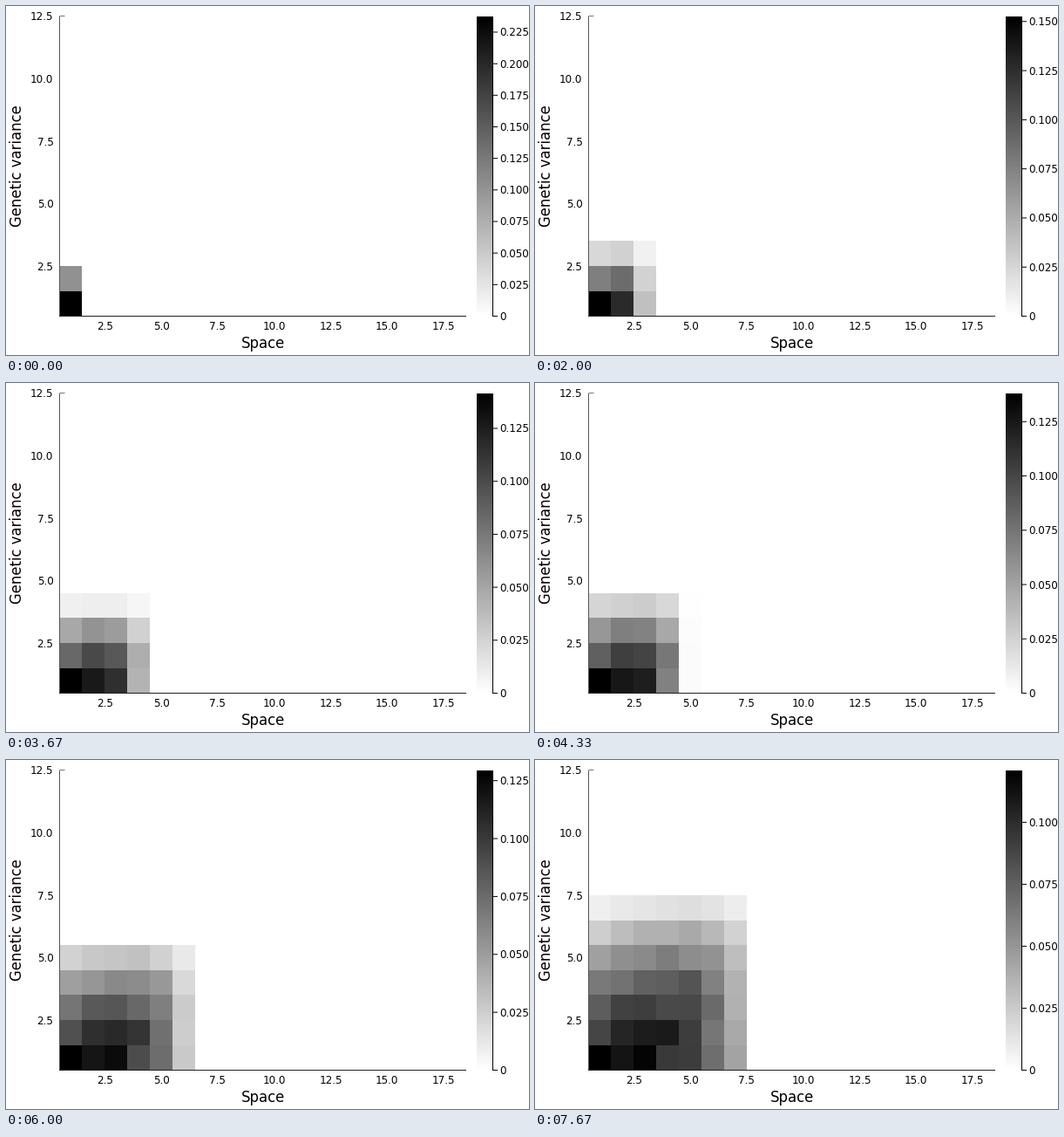
A matplotlib script that plays this animation: 600 px wide and 400 px high, repeating every 8 s.

```python
import matplotlib.pyplot as plt
import numpy as np
from matplotlib.animation import FuncAnimation

W, H, DPI = 600, 400, 100
STEPS, LOOP_MS, INTERVAL = 24, 8000, 50
LEFT, RIGHT, TOP, BOTTOM = 61.5, 528, 12, 355.3
COLS, ROWS = 18, 12
BAR_LEFT, BAR_RIGHT = 540, 558
TICK_STEP = 0.025

rng = np.random.default_rng(4)
grain = rng.uniform(0.9, 1.1, (ROWS, COLS))
space, variance = np.meshgrid(np.arange(COLS), np.arange(ROWS))


def density(step):
    """Relative density behind a front that spreads in both directions."""
    u = step / (STEPS - 1)
    reach = 1 + 6 * u ** 1.2
    height = 2 + 4.5 * u ** 1.8
    along = np.clip(1 - (space / reach) ** 3, 0, 1)
    # The upper edge is steeper further out in space.
    up = np.clip(1 - (variance / height) ** (1 + 0.3 * space), 0, 1)
    cells = along * up * grain
    return cells / cells.max()


def peak_density(step):
    return 0.16 - 0.0017 * step + 0.0774 * np.exp(-step / 1.8)


plt.rcParams["font.family"] = "DejaVu Sans"
fig = plt.figure(figsize=(W / DPI, H / DPI), dpi=DPI, facecolor="white")
ax = fig.add_axes([0, 0, 1, 1])
ax.axis("off")


def px(size):
    return size * 72 / DPI


def line(xs, ys, color="black"):
    return ax.plot(xs, ys, color=color, lw=px(1), solid_capstyle="butt",
                   snap=False)[0]


def label(x, y, text, size=12, **style):
    return ax.text(x, y, text, fontsize=px(size), color="black",
                   va="baseline", **style)


def shades(xs, ys, values):
    return ax.pcolormesh(xs, ys, values, cmap="gray_r", vmin=0, vmax=1)


heat = shades(np.round(np.linspace(LEFT, RIGHT, COLS + 1)),
              np.round(np.linspace(BOTTOM, TOP, ROWS + 1)), density(0))
shades([BAR_LEFT, BAR_RIGHT], np.linspace(355, TOP, 257),
       np.linspace(0, 1, 256)[:, None])
ax.set_xlim(0, W)
ax.set_ylim(H, 0)

line([LEFT, LEFT], [TOP, BOTTOM], "#555555")
line([LEFT, 67.5], [11.5, 11.5], "#777777")
line([LEFT - 0.5, RIGHT], [355.5, 355.5], "#222222")
line([BAR_RIGHT + 0.5, BAR_RIGHT + 0.5], [TOP, 356])

for value in np.arange(2.5, 18, 2.5):
    x = LEFT + (value - 0.5) / COLS * (RIGHT - LEFT)
    label(x, 371, f"{value:.1f}", ha="center")
for value in np.arange(2.5, 13, 2.5):
    y = BOTTOM - (value - 0.5) / ROWS * (BOTTOM - TOP)
    label(54.5, y + 4.5, f"{value:.1f}", ha="right")
label(295, 392, "Space", 16.5, ha="center")
label(18, 183.5, "Genetic variance", 16.5, ha="center", rotation=90,
      rotation_mode="anchor")

values = TICK_STEP * np.arange(10)
ticks = [line([BAR_RIGHT, 564], [0, 0]) for _ in values]
tick_labels = [label(566.3, 0, f"{v:.3f}" if v else "0", ha="left")
               for v in values]


def update(frame):
    # Each step begins just before its nominal time.
    step = (frame * INTERVAL + 40) * STEPS // LOOP_MS
    heat.set_array(density(step))
    peak = peak_density(step)
    for value, tick, text in zip(values, ticks, tick_labels):
        y = 355.5 - value / peak * (355.5 - TOP)
        shown = value <= peak
        tick.set_ydata([y, y])
        text.set_y(y + 4.5)
        tick.set_visible(shown)
        text.set_visible(shown)
    return [heat, *ticks, *tick_labels]


anim = FuncAnimation(fig, update, frames=LOOP_MS // INTERVAL,
                     interval=INTERVAL, init_func=lambda: update(0),
                     repeat=True, repeat_delay=0, blit=False)
plt.show()
```
